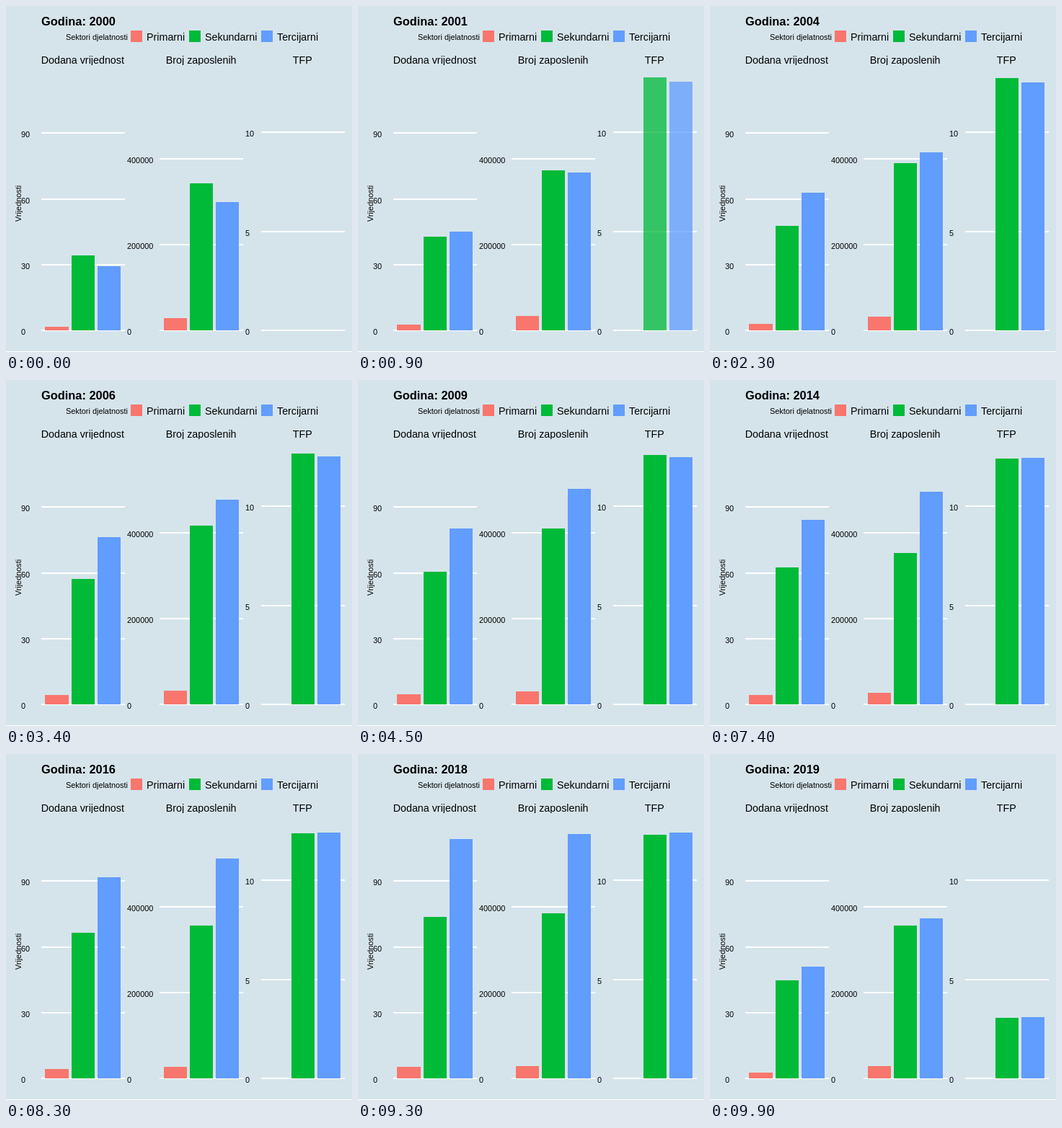
Recreate the animation shown at these times as an HTML page. Size 480 by 480 pixels, loop 10 s.

```html
<!DOCTYPE html>
<html lang="hr">
<head>
<meta charset="utf-8">
<title>Sektori djelatnosti</title>
<style>
  html, body { margin: 0; width: 100%; height: 100%; overflow: hidden; background: #d5e4eb; }
  svg { display: block; width: 480px; height: 480px; font-family: "Liberation Sans", Arial, sans-serif; }
  rect { shape-rendering: crispEdges; }
  .small { font-size: 10.9px; }
  .label { font-size: 14.3px; }
  .title { font-size: 16.4px; font-weight: bold; }
</style>
</head>
<body>
<svg id="stage" viewBox="0 0 480 480">
  <clipPath id="strip"><rect width="480" height="82"/></clipPath>
  <rect width="480" height="480" fill="#d5e4eb"/>
  <rect y="479" width="480" height="1" fill="#fff"/>
  <g id="grid"></g>
  <g id="bars"></g>
  <g id="texts">
    <text class="title" id="title" x="49" y="27"></text>
    <text class="small" x="83" y="47">Sektori djelatnosti</text>
    <text class="small" transform="translate(21 274) rotate(-90)" text-anchor="middle">Vrijednosti</text>
  </g>
</svg>
<script>
const BASE = 450, FRAME = 100, STEPS = 5, YEARS = 20;
const BAR_WIDTH = 32.4, BAR_PITCH = 36.1;
const $ = id => document.getElementById(id);

function add(parent, tag, attrs, text) {
  const node = document.createElementNS("http://www.w3.org/2000/svg", tag);
  for (const key in attrs) node.setAttribute(key, attrs[key]);
  if (text !== undefined) node.textContent = text;
  parent.appendChild(node);
  return node;
}

const mix = (a, b, k) => a + (b - a) * k;
const sineInOut = p => (1 - Math.cos(Math.PI * p)) / 2;

// Turning points of the series; the years between follow straight lines.
const keyYears = [0, 1, 2, 5, 8, 9, 13, 16, 19];
function series(...tops) {
  return year => {
    const i = Math.max(1, keyYears.findIndex(key => key >= year));
    const p = (year - keyYears[i - 1]) / (keyYears[i] - keyYears[i - 1]);
    return mix(tops[i - 1], tops[i], p);
  };
}

const sectors = [
  { name: "Primarni", x: 173, fill: "#f8766d" },
  { name: "Sekundarni", x: 254, fill: "#00ba38" },
  { name: "Tercijarni", x: 354, fill: "#619cff" }
];

// Each panel has one rule per sector giving the bar's top edge in a year.
const panels = [
  { name: "Dodana vrijednost", x: 49, labelX: 21, unit: 30, ticks: 4, gap: 91.25, tops: [
    series(445, 442, 442, 440, 434, 436, 437, 437, 433),
    series(346, 339.5, 313.5, 302, 258, 266, 274, 250.7, 218),
    series(361, 331, 307, 243, 200, 206, 216, 177.6, 98)] },
  { name: "Broj zaposlenih", x: 213.4, labelX: 168, unit: 200000, ticks: 3, gap: 119, tops: [
    series(433, 430, 430, 431, 431, 432, 433, 434, 433),
    series(246, 234, 226, 215.3, 192, 206, 240, 240.2, 214),
    series(272, 241, 228, 194.7, 145, 151, 163, 149.3, 98)] },
  { name: "TFP", x: 354, labelX: 332, unit: 5, ticks: 3, gap: 137.4, firstYear: 2, tops: [
    null,
    year => 97 + 0.8 * year,
    year => 104.5 + 0.27 * year] }
];

const bars = [];
for (const panel of panels) {
  for (let i = 0; i < panel.ticks; i++) {
    const y = Math.round(BASE - i * panel.gap);
    add($("grid"), "rect", { x: Math.floor(panel.x), y: y - 1, width: 116, height: 2, fill: "#fff" });
    add($("texts"), "text", { class: "small", x: panel.labelX, y: y + 5.5 }, i * panel.unit);
  }
  const strip = add($("texts"), "g", { "clip-path": "url(#strip)" });
  add(strip, "text", { class: "label", x: panel.x + 57.3, y: 80, "text-anchor": "middle" }, panel.name);

  panel.tops.forEach((top, i) => {
    if (!top) return;
    const x = panel.x + 5.4 + i * BAR_PITCH;
    const node = add($("bars"), "rect", { x, width: BAR_WIDTH, fill: sectors[i].fill });
    bars.push({ node, top, firstYear: panel.firstYear || 0 });
  });
}

for (const { name, x, fill } of sectors) {
  add($("texts"), "rect", { x, y: 34, width: 16, height: 16, fill });
  add($("texts"), "text", { class: "label", x: x + 22, y: 48 }, name);
}

// New bars fade in at full height; bars without a next value shrink to the base.
function pose({ top, firstYear }, year, k) {
  const next = (year + 1) % YEARS;
  const shown = y => y >= firstYear;
  const entering = !shown(year) && shown(next);
  const topIn = y => shown(y) ? top(y) : BASE;
  return {
    y: Math.round(mix(topIn(entering ? next : year), topIn(next), k)),
    opacity: entering ? k : 1
  };
}

function render(time) {
  const frame = Math.floor(time / FRAME) % (YEARS * STEPS);
  const year = Math.floor(frame / STEPS);
  const rest = year ? 2 : 1; // the opening year starts to move one step early
  const k = sineInOut(Math.max(0, frame % STEPS - rest) / (STEPS - rest));
  $("title").textContent = "Godina: " + (2000 + year);
  for (const bar of bars) {
    const { y, opacity } = pose(bar, year, k);
    bar.node.setAttribute("y", y);
    bar.node.setAttribute("height", BASE - y);
    bar.node.setAttribute("opacity", opacity);
  }
}

const origin = performance.now();
function tick() {
  render(performance.now() - origin);
  requestAnimationFrame(tick);
}
tick();
</script>
</body>
</html>
```
